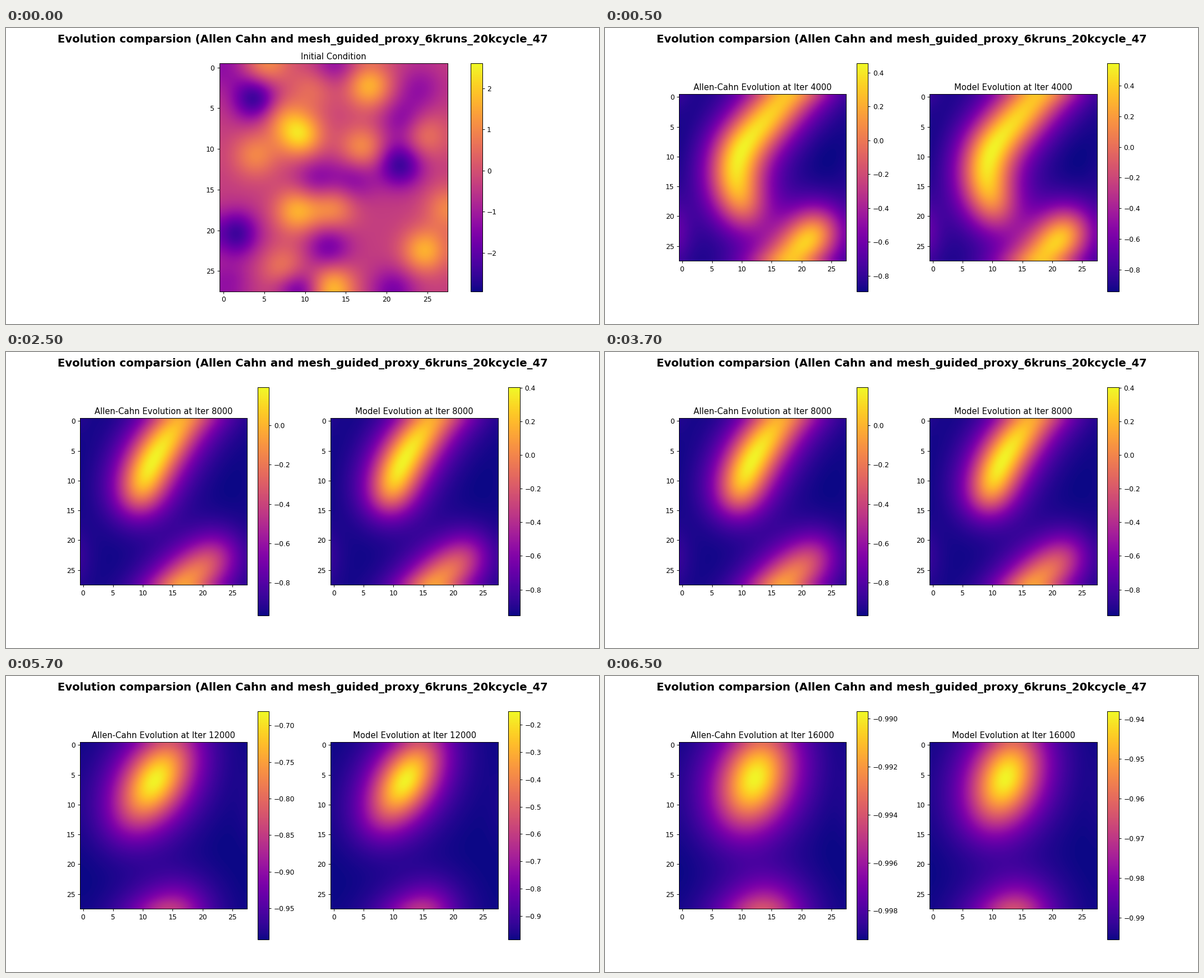
These frames come from a looping animation (1058 px wide and 529 px high, 8 s). A matplotlib script:

```python
import numpy as np
import matplotlib.pyplot as plt
from matplotlib.animation import FuncAnimation

W = 1058
N = 28
TITLE = "Evolution comparsion (Allen Cahn and mesh_guided_proxy_6kruns_20kcycle_47"
Y, X = np.mgrid[:N, :N].astype(float)


def noise(peaks, base=-.35, sigma=1.9):
    """Smooth field that passes through the given level at each peak."""
    x, y, level = np.array([(*p, lv) for lv, pts in peaks.items()
                            for p in pts]).T

    def bumps(px, py):
        r2 = (px[..., None] - x) ** 2 + (py[..., None] - y) ** 2
        return np.exp(-r2 / (2 * sigma ** 2))

    return base + bumps(X, Y) @ np.linalg.solve(bumps(x, y), level - base)


def wrap(d):
    return (d + N / 2) % N - N / 2


def band(spine, width):
    """Soft band along a spine of (x, y, weight) on a periodic grid, 0 to 1."""
    keys = np.array(spine, float)
    arc = np.append(0, np.cumsum(np.hypot(*np.diff(keys[:, :2], axis=0).T)))
    s = np.linspace(0, arc[-1], 60)
    x, y, weight = (np.interp(s, arc, k) for k in keys.T)
    r = np.hypot(wrap(X[..., None] - x), wrap(Y[..., None] - y))
    f = (weight / np.cosh(.88 * r / width) ** 2).sum(-1)
    return (f - f.min()) / np.ptp(f)


def ray(x, y, reach, tilt):
    """Straight spine that fades out from its middle towards both ends."""
    dx, dy = reach * np.sin(np.radians(tilt)), reach * np.cos(np.radians(tilt))
    return [(x - dx, y + dy, 0), (x, y, 1), (x + dx, y - dy, 0)]


start = noise({
    2.5: [(9.4, 8.3)],
    1.8: [(17.8, 2.3), (9, 17.6), (24.6, 22.5), (13.3, 27)],
    1.1: [(5.2, -.3), (7, 6), (3.9, 10.8), (17, 10), (13.4, 17.3),
          (27.5, 17.3)],
    .5: [(11, 2.5), (24.5, 8.4), (7.5, 24.8)],
    -1.3: [(0, 0), (13.5, -.5), (21.9, 6.5), (24, 2.5), (11.5, 13.8),
           (16, 13.6), (.5, 26.5)],
    -1.7: [(12.8, 22), (9, 27.3), (20.8, 27.4)],
    -2.6: [(3.9, 3.8), (21.6, 11.9), (1.5, 20.4)],
})

# The bent band straightens, then shrinks to a fading spot
bent = [(10.9, 20.3, .9), (8.5, 14, .95), (9.1, 9, 1), (15, 2.8, .95),
        (19.5, -2.5, .75), (23.4, -6.3, 1.7)]
straight = [(8.9, 13.8, 1), (11, 7.5, 1), (14, 3, .95), (17.2, -1.2, .72),
            (23.5, -6.3, .6)]

# Per step: spine, then (width, low, high) for the solver and for the model
steps = [
    (bent, (3.7, -.892, .4545), (3.7, -.9415, .544)),
    (straight, (3.5, -.969, .194), (3.4, -.954, .4016)),
    (ray(12, 6.1, 11, 32), (4.3, -.9927, -.681), (3.9, -.9856, -.152)),
    (ray(12.2, 5.7, 10, 21), (4.95, -.999195, -.98971),
     (4.6, -.99539, -.9381)),
]

fig = plt.figure(figsize=(12, 6), dpi=W / 12)


def panel(pos, title, data, lo, hi):
    ax = fig.add_subplot(*pos)
    im = ax.imshow(data, cmap="plasma", vmin=lo, vmax=hi,
                   interpolation="bicubic")
    ax.set_title(title)
    fig.colorbar(im, ax=ax)


def draw(i):
    fig.clear()
    fig.suptitle(TITLE, fontsize=16, fontweight="bold")
    step = (i + 3) // 4
    if step == 0:
        panel((1, 1, 1), "Initial Condition", start, -2.94, 2.6)
        return
    spine, *sides = steps[step - 1]
    for col, (name, (width, lo, hi)) in enumerate(
            zip(("Allen-Cahn", "Model"), sides), 1):
        panel((1, 2, col), f"{name} Evolution at Iter {4000 * step}",
              lo + (hi - lo) * band(spine, width), lo, hi)


anim = FuncAnimation(fig, draw, frames=16, interval=500,
                     init_func=lambda: None, repeat=True, repeat_delay=0,
                     blit=False)
plt.show()
```
